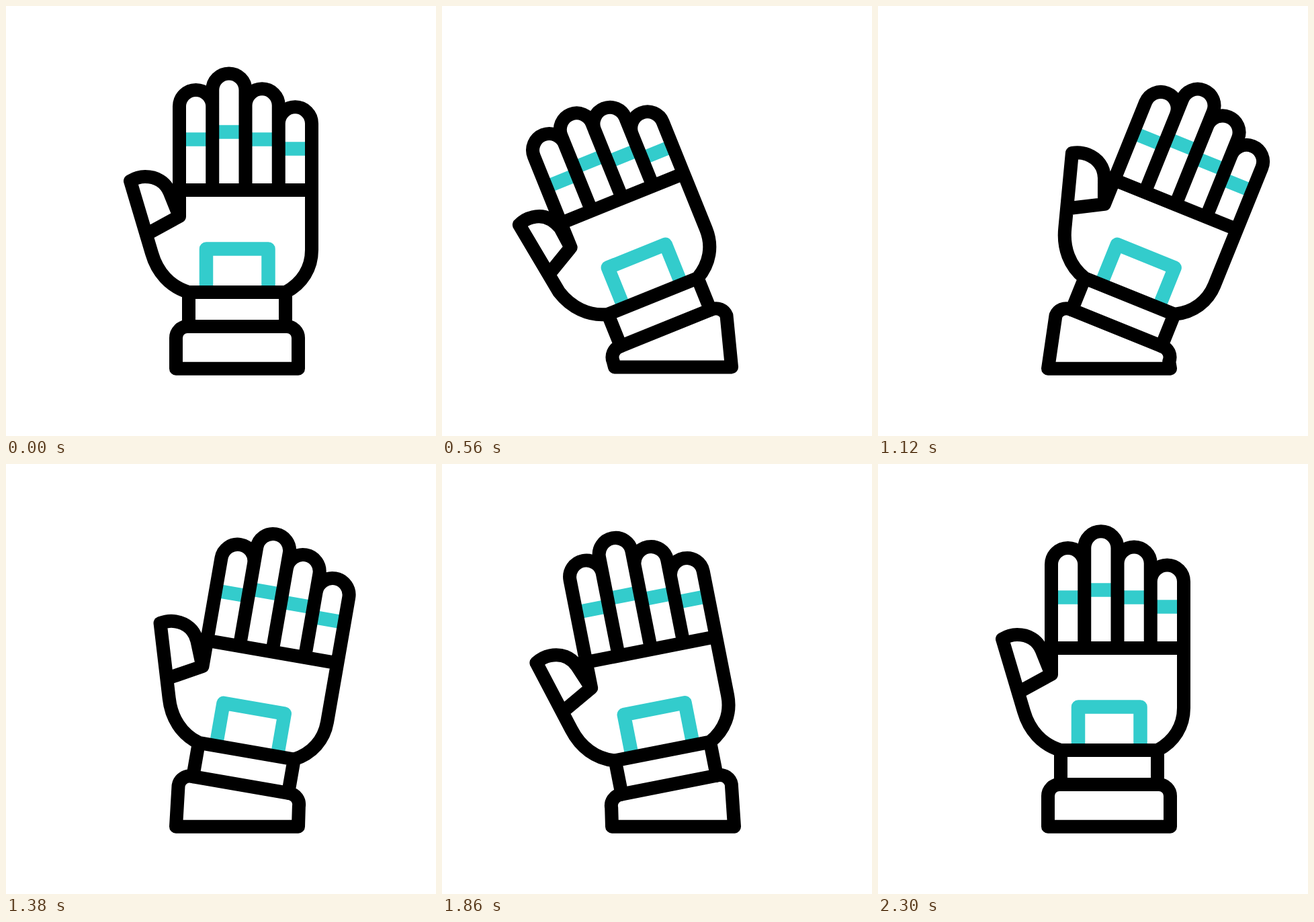
Write an HTML page that moves like this. It is 640x640 px and loops after 2400 ms.

```html
<!DOCTYPE html>
<html lang="en">
<head>
<meta charset="utf-8">
<title>Waving glove</title>
<style>
  html, body { margin: 0; width: 100%; height: 100%; overflow: hidden; background: #fff; }
  svg { display: block; width: 100%; height: 100%; }
  path { fill: none; stroke: #000; stroke-width: 20; stroke-linejoin: round; }
  #accent { stroke: #33cccc; stroke-width: 20.5; }
  #ink { stroke-linecap: round; }
</style>
</head>
<body>
<svg viewBox="0 0 640 640">
  <g id="hand">
    <path id="accent"/>
    <path id="ink"/>
  </g>
  <path id="cuff"/>
</svg>
<script>
const LOOP = 2400;
const PIVOT = [344, 507];
const LEFT = 258, WIDTH = 49.25, KNUCKLES = 274;

// [time, value] keys, eased between neighbours
const SWING = [[0, 0], [510, -22], [610, -22], [1120, 22], [1700, -12], [1710, -12], [2300, 0]];
const CURL = [[0, 0], [100, 0], [610, 1], [800, 1], [1110, 0]];

// cap: height of the fingertip arc, drop: how far it sinks when curled
const FINGERS = [
  { cap: 149.5, drop: 17.5, band: 198.5 },
  { cap: 125, drop: 29, band: 187.5 },
  { cap: 148, drop: 16.5, band: 198.5 },
  { cap: 175, drop: 16.5, band: 212.5 }
];

const $ = id => document.getElementById(id);
const mix = (a, b, k) => a + (b - a) * k;

// cubic-bezier(2/3, 0, 1/3, 1)
function ease(x) {
  let lo = 0, hi = 1;
  for (let i = 0; i < 20; i++) {
    const t = (lo + hi) / 2;
    if (2 * t - 3 * t * t + 2 * t ** 3 < x) lo = t; else hi = t;
  }
  return lo * lo * (3 - 2 * lo);
}

function valueAt(keys, time) {
  const next = keys.findIndex(key => key[0] > time);
  if (next < 0) return keys[keys.length - 1][1];
  const [t0, v0] = keys[next - 1], [t1, v1] = keys[next];
  return mix(v0, v1, ease((time - t0) / (t1 - t0)));
}

function accentPath(curl) {
  const bands = FINGERS.map((f, i) => `M${LEFT + i * WIDTH},${f.band + 17.5 * curl}h${WIDTH}`);
  return bands.join('') + 'M298,426V361.5H390.5V426';
}

function inkPath(curl) {
  const r = WIDTH / 2;
  const fingers = FINGERS.map((f, i) => {
    const x = LEFT + i * WIDTH, y = f.cap + f.drop * curl;
    return `M${x},${KNUCKLES}V${y}A${r},${r} 0 0 1 ${x + WIDTH},${y}V${KNUCKLES}`;
  }).join('');

  const at = (x, y, dx, dy) => [x + dx * curl, y + dy * curl];
  const tip = at(185, 260.5, 14.6, -7.5);
  const top = at(207, 254, 15, -4);
  const bend = at(243.5, 277, 11, 3);
  const web = [mix(tip[0], 217, 0.74), mix(tip[1], 368, 0.74)];
  const thumb = `M${tip}Q${at(196, 254, 14.6, -6)} ${top}`
    + `C${at(224, 254, 15, -2)} ${at(237, 262, 12, 1)} ${bend}L258,313`
    + `M${LEFT},${KNUCKLES}V313L${web}`;
  const palm = `M${tip}L217,368C225,396 244,418 272,426H416C441,413 455,390 455,363V${KNUCKLES}H${LEFT}`;
  const wrist = 'M272,426V477M416,426V477';
  return fingers + thumb + palm + wrist;
}

// The top edge follows the hand while the base stays put
function cuffPath(angle, curl) {
  const a = angle * Math.PI / 180, c = Math.cos(a), s = Math.sin(a);
  const turn = (x, y) => {
    const dx = x - PIVOT[0], dy = y - PIVOT[1];
    return [PIVOT[0] + dx * c - dy * s, PIVOT[1] + dx * s + dy * c];
  };
  const arc = 'A17,17 0 0 1 ';
  return `M${253 + 4 * curl},${539.7 - 2.3 * curl}L${turn(253, 494)}${arc}${turn(270, 477)}`
    + `L${turn(418, 477)}${arc}${turn(435, 494)}L${435 - 4 * curl},${539.7 - 2.3 * curl}Z`;
}

function draw(now) {
  const time = now % LOOP;
  const angle = valueAt(SWING, time), curl = valueAt(CURL, time);
  $('hand').setAttribute('transform', `rotate(${angle} ${PIVOT})`);
  $('accent').setAttribute('d', accentPath(curl));
  $('ink').setAttribute('d', inkPath(curl));
  $('cuff').setAttribute('d', cuffPath(angle, curl));
}

const start = performance.now();
function loop() {
  draw(performance.now() - start);
  requestAnimationFrame(loop);
}
loop();
</script>
</body>
</html>
```
